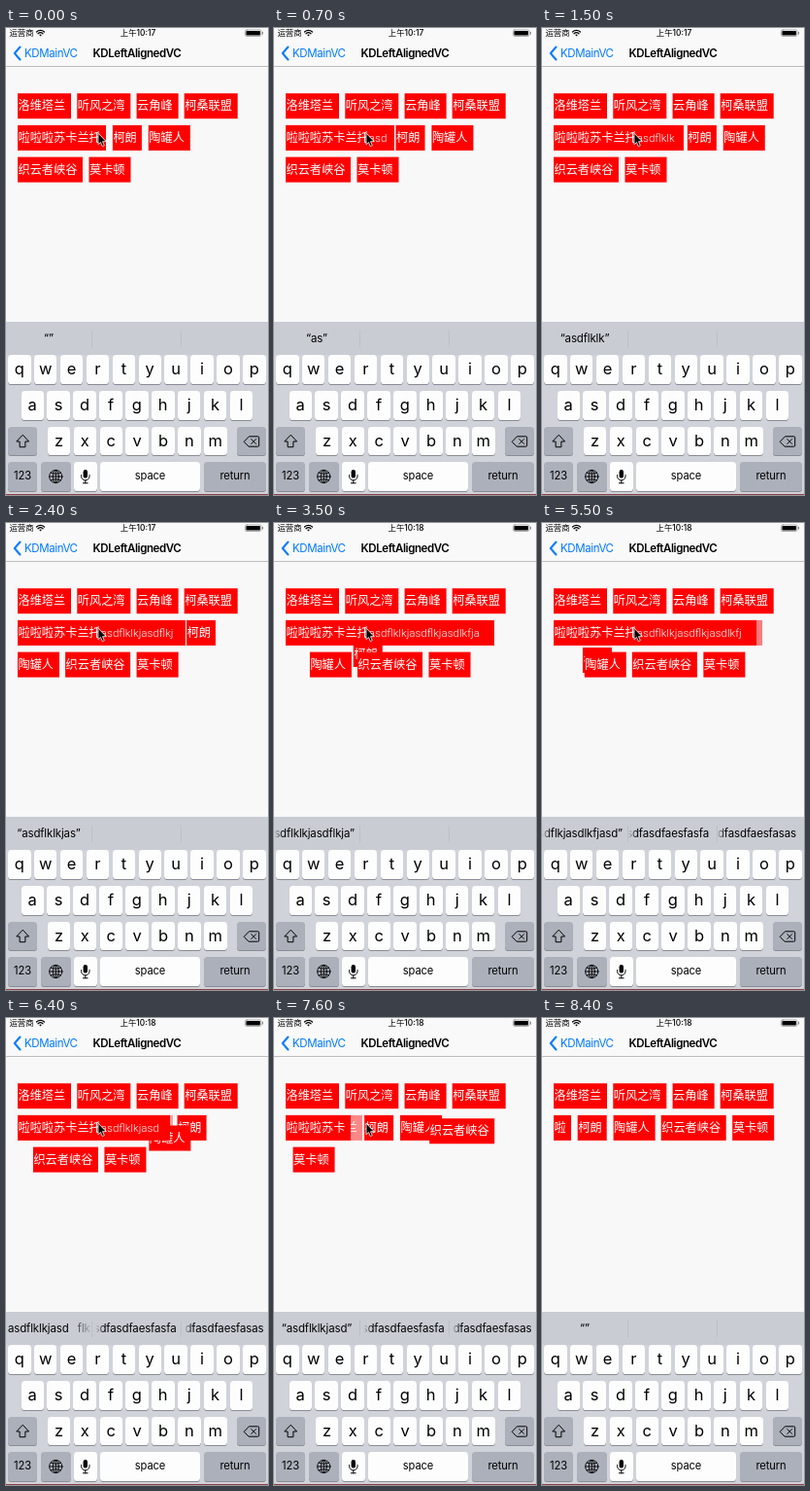
Write an HTML page that moves like this. It is 270 px wide and 480 px high and loops after 8500 ms.

```html
<!DOCTYPE html>
<html lang="zh">
<head>
<meta charset="utf-8">
<title>KDLeftAlignedVC</title>
<style>
html, body { margin: 0; width: 100%; height: 100%; overflow: hidden; background: #f8f8f8; }
#stage { position: relative; width: 270px; height: 480px; overflow: hidden; background: #f8f8f8;
  font: 11.5px/1 Inter, "Noto Sans CJK SC", "Noto Sans CJK", sans-serif; color: #000; }
#stage > *, .bar > *, .key { position: absolute; white-space: nowrap; }
.nav { left: 0; top: 0; width: 270px; height: 39px; background: #f9f9f9; border-bottom: 1px solid #bdbdbf; }
.status { top: 0; font-size: 8.4px; line-height: 10px; }
#clock { left: 96px; width: 80px; text-align: center; font-weight: 500; }
.title { top: 16px; line-height: 20px; letter-spacing: -.4px; }
.chip { left: 0; top: 0; height: 26px; background: #f00; color: #fff; overflow: hidden;
  font: 300 12.2px/26px Roboto, "Noto Sans CJK SC", "Noto Sans CJK", sans-serif; text-indent: .5px; }
.chip span { font-size: 11.6px; }
.board { left: 0; top: 302px; width: 270px; height: 178px; background: #d0d3d9; }
.bar { left: 0; top: 302px; width: 270px; height: 34px; background: #c9ccd3; line-height: 35px; }
.bar i { top: 9px; width: 1px; height: 17px; background: #bcc0c7; }
.cell { top: 0; height: 34px; display: flex; overflow: hidden; justify-content: flex-end; letter-spacing: -.15px;
  -webkit-mask-image: linear-gradient(90deg, transparent, #000 9px);
  mask-image: linear-gradient(90deg, transparent, #000 9px); }
.cell.fit { justify-content: center; -webkit-mask-image: none; mask-image: none; }
.cell.cut { justify-content: flex-start; -webkit-mask-image: linear-gradient(90deg, #000 72%, transparent);
  mask-image: linear-gradient(90deg, #000 72%, transparent); }
.key { height: 29.5px; border-radius: 3.6px; background: #fdfdfd; box-shadow: 0 1px #898c92;
  text-align: center; font-size: 16.5px; line-height: 28.5px; }
.key.word { font-size: 11.2px; line-height: 29.5px; letter-spacing: -.1px; }
.key.dark { background: #abb0ba; }
svg { left: 0; top: 0; }
.edge { left: 0; top: 479px; width: 270px; height: 1px; background: #8f3f46; }
</style>
</head>
<body>
<div id="stage">
  <div class="nav"></div>
  <div class="status" style="left:3.5px">运营商</div>
  <div class="status" id="clock"></div>
  <div class="title" style="left:19px;color:#007aff">KDMainVC</div>
  <div class="title" style="left:75px;width:120px;text-align:center;font-weight:600">KDLeftAlignedVC</div>
  <div class="board"></div>
  <div class="bar">
    <i style="left:88px"></i><i style="left:180px"></i>
    <div class="cell" id="typed"></div>
    <div class="cell hint" style="left:89px;width:83px">asdfasdfaesfasfa</div>
    <div class="cell hint" style="left:180px;width:82px">asdfasdfaesfasas</div>
  </div>
</div>
<script>
const LOOP = 8500, MOVE = 260;
const LEFT = 12, RIGHT = 257.7, GAP = 6.5, TOP = 67.2, PITCH = 32.7;
const stage = document.getElementById('stage');
const clock = document.getElementById('clock');
const typed = document.getElementById('typed');
const hints = document.querySelectorAll('.hint');

function add(className, text = '', style = {}) {
  const el = document.createElement('div');
  el.className = className;
  el.textContent = text;
  Object.assign(el.style, style);
  return stage.appendChild(el);
}

// Keyboard
function key(x, y, width, label = '', kind = '') {
  add('key ' + kind, label, { left: x + 'px', top: y + 'px', width: width + 'px' });
}
[['qwertyuiop', 2, 336], ['asdfghjkl', 15.5, 373], ['zxcvbnm', 42.7, 409.7]].forEach(([row, x, y]) =>
  [...row].forEach((letter, i) => key(x + i * 26.9, y, 23.5, letter)));
key(2, 409.7, 30, '', 'dark');
key(238, 409.7, 30, '', 'dark');
key(2, 446, 30, '123', 'word dark');
key(36, 446, 30.5, '', 'dark');
key(70, 446, 23.5);
key(97, 446, 103, 'space', 'word');
key(204, 446, 64, 'return', 'word dark');
add('edge');

// Tags
const HEAD = '啦啦啦苏卡兰托';
const TAIL = 'asdflklkjasdflkjasdlkfjasd';
const names = ['洛维塔兰', '听风之湾', '云角峰', '柯桑联盟', HEAD, '柯朗', '陶罐人', '织云者峡谷', '莫卡顿'];
const EDITED = 4;

const charWidth = c => c > 'z' ? 12.2 : 'fjl'.includes(c) ? 3 : 6.7;
const tagWidth = text => [...text].reduce((sum, c) => sum + charWidth(c), 6);

function layout(text) {
  let x = LEFT, y = TOP;
  return names.map((name, i) => {
    const width = tagWidth(i === EDITED ? text : name);
    if (x + width > RIGHT && x > LEFT) { x = LEFT; y += PITCH; }
    const place = { x, y };
    x += width + GAP;
    return place;
  });
}

// Edits: evenly spaced key strokes from one length to another
const full = HEAD + TAIL;
const edits = [];
function stroke(from, to, start, end) {
  const count = Math.abs(to - from), dir = Math.sign(to - from);
  for (let i = 1; i <= count; i++) {
    const time = count > 1 ? start + (end - start) * (i - 1) / (count - 1) : start;
    edits.push({ time, text: full.slice(0, from + dir * i) });
  }
}
stroke(7, 15, 300, 1350);
stroke(15, 31, 1515, 3340);
stroke(31, 33, 3520, 3650);
stroke(33, 30, 5294, 5440);
stroke(30, 19, 5513, 6240);
stroke(19, 5, 6405, 7475);
stroke(5, 1, 7610, 7860);

const home = layout(HEAD);
let last = home;
for (const edit of edits) {
  const next = layout(edit.text);
  edit.shift = next.map((p, i) => ({ x: p.x - last[i].x, y: p.y - last[i].y }));
  last = next;
}

function fill(chip, text) {
  if (chip.dataset.text === text) return;
  chip.dataset.text = text;
  chip.textContent = text.slice(0, HEAD.length);
  const latin = document.createElement('span');
  latin.textContent = text.slice(HEAD.length);
  chip.append(latin);
  chip.style.width = tagWidth(text) + 'px';
}
const place = (el, x, y) => { el.style.transform = `translate(${x}px, ${y}px)`; };

const ghost = add('chip');
const chips = names.map(name => {
  const chip = add('chip');
  fill(chip, name);
  return chip;
});
stage.append(chips[EDITED]);
place(ghost, home[EDITED].x, home[EDITED].y);

stage.insertAdjacentHTML('beforeend', `
<svg width="270" height="480" fill="none" stroke="#000" stroke-linejoin="round" stroke-linecap="round">
  <path d="M14.5 19.5 8.8 26l5.7 6.5" stroke="#007aff" stroke-width="2"/>
  <path d="M31.5 4a5.8 5.8 0 0 1 8 0M33 5.8a3.6 3.6 0 0 1 5 0" stroke-width="1.2"/>
  <path d="M34.2 7.1 35.5 8.5l1.3-1.4q-1.3-1-2.6 0z" fill="#000" stroke="none"/>
  <rect x="246.4" y="1.9" width="16.6" height="6.6" rx="1.7" stroke-width=".6" stroke="#777"/>
  <rect x="247.4" y="2.9" width="14.6" height="4.6" rx=".8" fill="#000" stroke="none"/>
  <path d="M264.4 4.2v2" stroke-width="1" stroke="#777"/>
  <path d="M17 418.5 10.8 425h3.3v5.7h5.8V425h3.3z"/>
  <path d="M245.5 425l5-5.2h9.2q1 0 1 1v8.4q0 1-1 1h-9.2zM252.8 422.6l4.8 4.8m0-4.8-4.8 4.8"/>
  <g stroke-width=".9"><circle cx="51.3" cy="461" r="6.6"/><ellipse cx="51.3" cy="461" rx="3" ry="6.6"/>
  <path d="M44.7 461h13.2M51.3 454.4v13.2M46 457.2q5.3 2.4 10.6 0M46 464.8q5.3-2.4 10.6 0"/></g>
  <rect x="79.6" y="454" width="4.4" height="8.6" rx="2.2" fill="#000" stroke="none"/>
  <path d="M77.6 459.5v1.2a4.2 4.2 0 0 0 8.4 0v-1.2M81.8 465v2.8M79.4 467.8h4.8"/>
  <path id="pointer" d="M95 108.5v11.2l2.5-2.3 1.8 4.2 2-.9-1.8-4h3.4z" fill="#000" stroke="#fff" stroke-width=".8"/>
</svg>`);
const pointer = document.getElementById('pointer');

// The suggestion bar follows the typing late: time, letters shown
const shown = [[0, 0], [500, 2], [900, 5], [1420, 8], [2000, 11], [2600, 14], [3200, 17],
  [3850, 26], [6050, 15], [6800, 12], [7900, 0]];

function drawBar(t) {
  const [, count] = shown.filter(([time]) => time <= t).pop();
  const cut = t >= 6050 && t < 6800;
  const word = TAIL.slice(0, count);
  const fit = count <= 12;
  typed.className = 'cell ' + (cut ? 'cut' : fit ? 'fit' : '');
  typed.style.left = cut ? '2px' : '0';
  typed.style.width = cut || fit ? '88px' : '83px';
  typed.textContent = cut ? word.slice(0, 12) + '\u00a0\u00a0\u00a0' + word.slice(12) : `“${word}”`;
  hints.forEach(hint => {
    hint.style.visibility = t >= 3850 && t < 7900 ? 'visible' : 'hidden';
    place(hint, t < 6050 ? 0 : 3.5, 0);
  });
}

function ease(p) {
  p = Math.min(1, Math.max(0, p));
  return p * p * (3 - 2 * p);
}

function draw(t) {
  const done = edits.filter(edit => edit.time <= t);
  const spots = home.map(p => ({ ...p }));
  for (const { time, shift } of done) {
    const p = ease((t - time) / MOVE);
    spots.forEach((spot, i) => {
      spot.x += shift[i].x * p;
      spot.y += shift[i].y * p;
    });
  }
  chips.forEach((chip, i) => place(chip, spots[i].x, spots[i].y));

  const current = done.at(-1), before = done.at(-2);
  fill(chips[EDITED], current ? current.text : HEAD);
  fill(ghost, before ? before.text : HEAD);
  ghost.style.opacity = current ? .5 * (1 - ease((t - current.time) / MOVE) ** 3) : 0;

  clock.textContent = t < 2500 ? '上午10:17' : '上午10:18';
  pointer.style.visibility = t < 8000 ? 'visible' : 'hidden';
  drawBar(t);
}

const start = performance.now();
function frame() {
  draw((performance.now() - start) % LOOP);
  requestAnimationFrame(frame);
}
frame();
</script>
</body>
</html>
```
